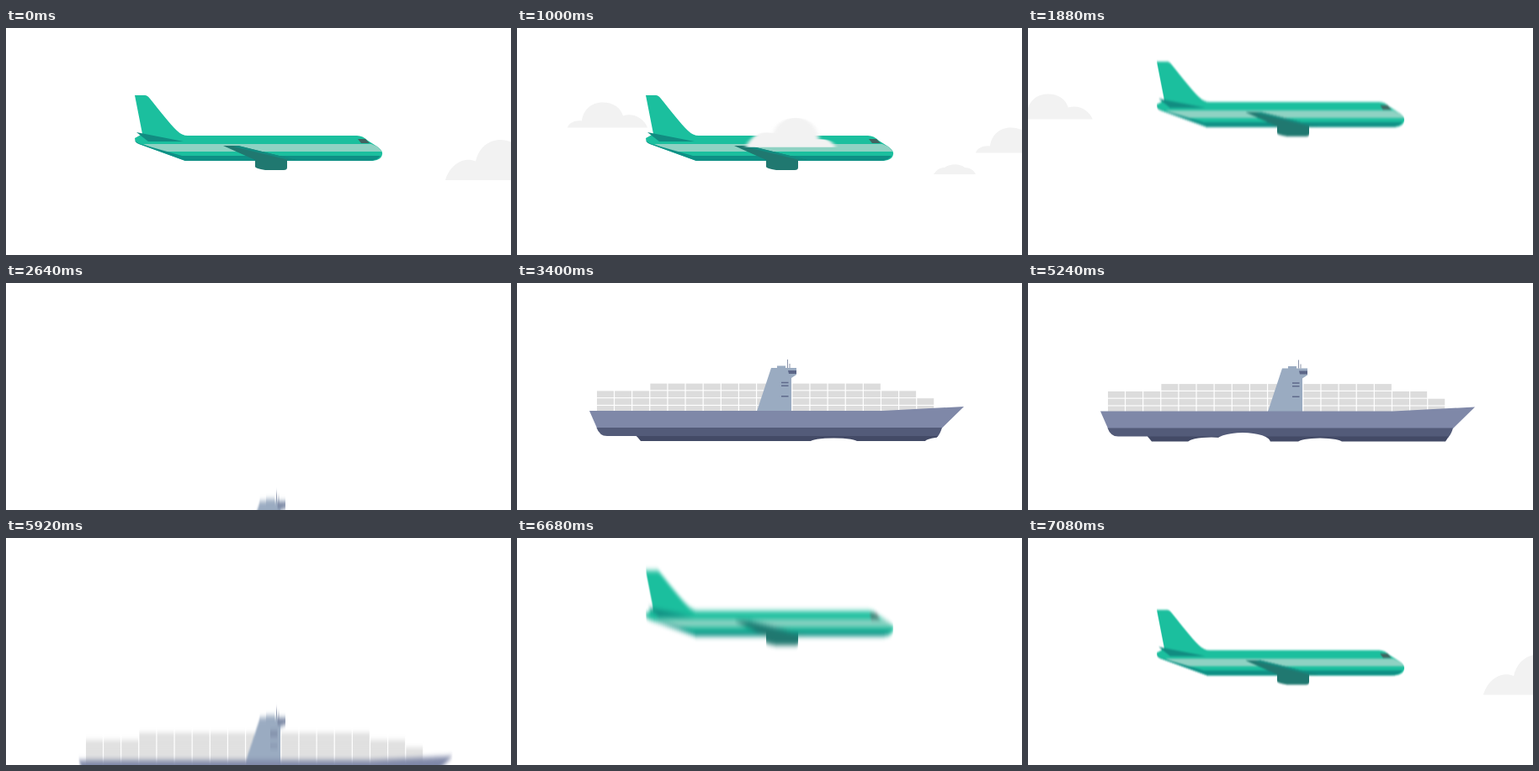
Animation of 600x270 px, one loop 7.12 s. Source, as an HTML page:

```html
<!DOCTYPE html>
<html lang="en">
<head>
<meta charset="utf-8">
<title>Plane and ship</title>
<style>
html, body { margin: 0; width: 100%; height: 100%; overflow: hidden; background: #fff; }
svg { display: block; width: 600px; height: 270px; }
.cloud { fill: #f2f2f2; }
</style>
</head>
<body>
<svg viewBox="0 0 600 270">
  <defs>
    <filter id="smear" filterUnits="userSpaceOnUse" x="-60" y="-60" width="720" height="420" color-interpolation-filters="sRGB">
      <feGaussianBlur id="smearAmount" stdDeviation="0 0"/>
    </filter>
    <filter id="drift" x="-20%" width="140%" color-interpolation-filters="sRGB">
      <feGaussianBlur stdDeviation="2.6 0"/>
    </filter>
    <path id="puff" d="M0 30C2 24 9 21 17 22C19 7 30 0 42 0C54 0 63 6 66 16C78 12 91 19 95 30Z"/>
    <path id="dome" d="M0 12C4 6 8 4 13 4C20-1 31-1 37 4C43 4 48 7 50 12Z"/>
  </defs>

  <g id="sky">
    <g class="cloud" data-x="1185"><use href="#puff" y="118.500"/></g>
    <g id="plane">
      <path fill="#1bbf9e" d="M153 80H165Q168 80 171 84C183 99 194 113 203 122Q209 128 216 128H417Q424 128 430 134L441 141Q448 146 447 150Q446 158 432 158H213L158 138Q153 136 153 131L162 126Z"/>
      <path fill="#8fd2c3" d="M163 138H434L441 141Q445 144 446.500 147H184Z"/>
      <path fill="#0e9085" d="M153 133Q154 136 160 138L209 152H445Q441 158 431 158H213L158 138Q153 136 153 133Z"/>
      <path fill="#118c81" d="M155 124L211 135H169Z"/>
      <path fill="#41635f" d="M418 132H427L432 137H422Z"/>
      <path fill="#207870" d="M258 140H276L345 157H334V166Q334 169 330 169H308Q296 167 296 165V157Z"/>
      <path fill="#128b80" d="M276 140L345 157H336L270 141Z"/>
    </g>
    <g class="cloud" data-x="522"><use href="#puff" transform="translate(118 133) scale(-1.242 1.600)"/></g>
    <g class="cloud" data-x="700"><use href="#puff" y="88.500"/></g>
    <g class="cloud" data-x="912"><use href="#puff" filter="url(#drift)" transform="translate(106 107) scale(-1.116 1.160)"/></g>
    <g class="cloud" data-x="1135"><use href="#dome" y="162"/></g>
  </g>

  <g id="ship">
    <g id="cargo" fill="#dcdcdc"></g>
    <path fill="#9aabc1" d="M285 152.500L302 101H309V98.500H319V101H332V109L326 113V152.500Z"/>
    <path fill="none" stroke="#8c95ac" d="M321.500 91V101M324 96V101"/>
    <path fill="#5c6688" d="M322 104H332V108H323Z"/>
    <path fill="none" stroke="#5f6a8b" stroke-width="1.500" d="M314 118.500H322.500M314 122.300H322.500M314 134.800H322.500"/>
    <path fill="#7f88a8" d="M86 152H434L531 147L505 172.500H95Z"/>
    <path fill="#535b79" d="M94.500 172H505Q503 179 499.500 183H143L142 182H107Q98 182 94.500 172Z"/>
    <path fill="#434a66" d="M142 182H500L496 188H147Z"/>
    <g id="waves" fill="#fff"></g>
  </g>
</svg>
<script>
const LOOP = 7120, STEP = 40;
const $ = id => document.getElementById(id);
const NS = 'http://www.w3.org/2000/svg';

function add(parent, tag, attrs) {
  const el = document.createElementNS(NS, tag);
  for (const key in attrs) el.setAttribute(key, attrs[key]);
  return parent.appendChild(el);
}

// Container stacks: rows per column.
for (let col = 0; col < 19; col++) {
  const rows = col < 3 ? 3 : col < 16 ? 4 : col < 18 ? 3 : 1.9;
  for (let row = 0; row < rows; row++) {
    const y = 146 - row * 8.8;
    add($('cargo'), 'rect', { x: 95 + col * 21.13, y, width: 19.9, height: 7.7 });
  }
}

// Wave crests under the hull: x at 5240 ms, half width, height.
const waves = [[82, 28, 4.5], [218, 28, 6], [255, 33, 11.5], [347, 26, 5]].map(([x, rx, ry]) =>
  ({ x, el: add($('waves'), 'ellipse', { rx, ry, cy: 189 }) }));
const clouds = [...document.querySelectorAll('.cloud')];

const sq = x => x * x;
const settle = u => u < 1 ? (1 + Math.cos(Math.PI * u)) / 2 : 0;

function planeY(t) {
  if (t < 1560) return 0;
  if (t < 4000) return -3.9e-4 * sq(t - 1560);
  if (t < 6940) return 27 - 1.01e-3 * sq(6940 - t);
  return 27 * settle((t - 6940) / 200);
}

function shipY(t) {
  if (t < 3210) return 5.08e-4 * sq(3210 - t) - 7;
  if (t < 5480) return -7 * settle((t - 3210) / 230);
  return 5.78e-4 * sq(t - 5480);
}

function place(el, path, t, base) {
  const y = path(t);
  const shown = Math.abs(y) < 300;
  el.style.display = shown ? '' : 'none';
  el.setAttribute('transform', `translate(0 ${y + base})`);
  return shown ? Math.abs(path(t + 10) - path(t - 10)) : 0;
}

function smear(el, length) {
  if (length < 0.8) return el.removeAttribute('filter');
  $('smearAmount').setAttribute('stdDeviation', `0 ${length / 3.46}`);
  el.setAttribute('filter', 'url(#smear)');
}

function draw(now) {
  const t = Math.floor(now % LOOP / STEP) * STEP;
  smear($('plane'), place($('sky'), planeY, t, 0));
  smear($('ship'), place($('ship'), shipY, t, 0.5));

  const shift = t > 6000 ? 0.475 * (t - LOOP) : 0.64 * t;
  for (const c of clouds) c.setAttribute('transform', `translate(${c.dataset.x - shift} 0)`);
  for (const w of waves) w.el.setAttribute('cx', w.x - 0.16 * (t - 5240));
}

function tick() {
  draw(performance.now());
  requestAnimationFrame(tick);
}
tick();
</script>
</body>
</html>
```
